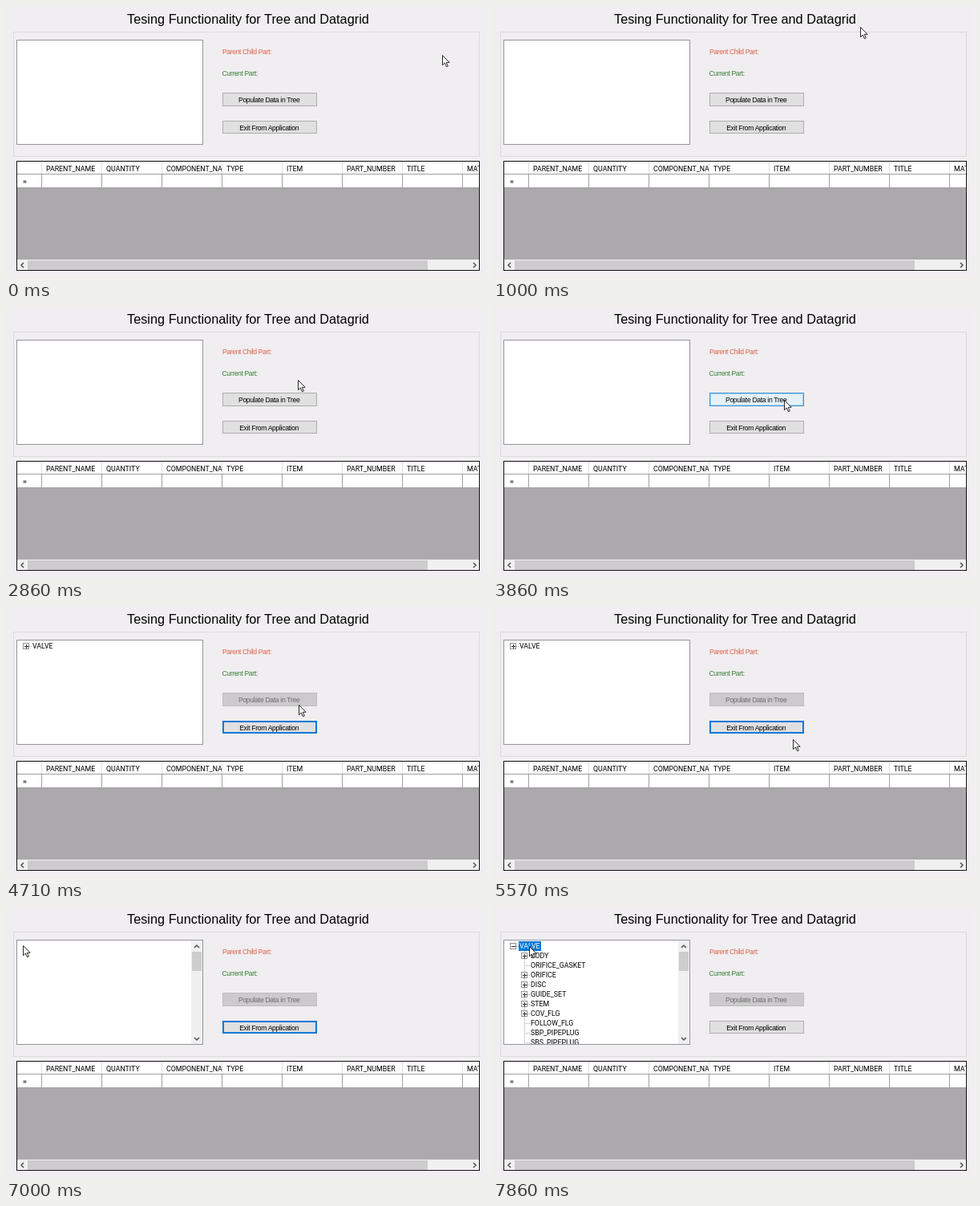
Animation, 600 px wide and 339 px high, one loop 8 s. Source, as an HTML page:

```html
<!DOCTYPE html>
<html lang="en">
<head>
<meta charset="utf-8">
<title>Tree and Datagrid</title>
<style>
  html, body { margin: 0; width: 100%; height: 100%; overflow: hidden; background: #f0eef0; }
  svg { display: block; width: 100%; height: 100%; }
  text { font: 8.6px "Liberation Sans", Arial, sans-serif; letter-spacing: -.38px; white-space: pre; }
  rect, .line { shape-rendering: crispEdges; }
  .line { fill: none; stroke: #a0a0a0; }
  .light { stroke: #dedede; }
  .chevron { fill: none; stroke: #505050; stroke-width: 1.5; }
  .dots { stroke-dasharray: 1 1; }
  #title { font-size: 16.25px; letter-spacing: .025px; }
  .caps text { font: 8.8px Roboto, sans-serif; letter-spacing: 0; }
  .button rect { fill: #e1e0e1; stroke: #adadad; }
  .button text { text-anchor: middle; letter-spacing: -.32px; }
  .button .ring { fill: none; stroke: none; }
  .hover rect { fill: #e5f1f8; stroke: #3c97d8; }
  .hover .ring { stroke: #a4cfec; }
  .focus rect, .focus .ring { stroke: #0078d7; }
  .disabled rect { fill: #cccacc; stroke: #bfbfbf; }
  .disabled text { fill: #6d6d6d; }
</style>
</head>
<body>
<svg viewBox="0 0 600 339">
  <clipPath id="treeClip"><rect x="14" y="43" width="231" height="129"/></clipPath>
  <clipPath id="gridClip"><rect x="14" y="194" width="576" height="135"/></clipPath>

  <text id="title" x="151" y="22">Tesing Functionality for Tree and Datagrid</text>
  <rect class="line" x="9.5" y="32.5" width="581" height="155" style="stroke:#dcdcdc"/>
  <text x="270" y="60" fill="#dc6048">Parent Child Part:</text>
  <text x="269.5" y="86.5" fill="#3a8038">Current Part:</text>

  <g id="populate" class="button">
    <rect x="270.5" y="108.5" width="117" height="16"/>
    <rect class="ring" x="271.5" y="109.5" width="115" height="14"/>
    <text x="328.2" y="120">Populate Data in Tree</text>
  </g>
  <g id="exit" class="button">
    <rect x="270.5" y="143.5" width="117" height="15"/>
    <rect class="ring" x="271.5" y="144.5" width="115" height="13"/>
    <text x="328.2" y="154.5">Exit From Application</text>
  </g>

  <rect x="13.5" y="42.5" width="232" height="130" fill="#fff" stroke="#94949c"/>
  <g class="caps" clip-path="url(#treeClip)">
    <g id="closedTree"></g>
    <g id="openTree"></g>
    <g id="treeScroll">
      <rect x="231" y="43" width="14" height="129" fill="#f0f0f0"/>
      <rect x="232" y="57" width="12" height="24" fill="#cdcdcd"/>
      <path class="chevron" d="M235 52l3-3 3 3M235 164l3 3 3-3"/>
    </g>
  </g>

  <g class="caps" clip-path="url(#gridClip)">
    <rect x="14" y="194" width="577" height="136" fill="#aba9ab"/>
    <rect x="14" y="194" width="577" height="32" fill="#fff"/>
    <path class="line" d="M14 209.5H590M14 226.5H590"/>
    <g id="headers"></g>
    <path d="M21 219h5M22.2 217l2.6 4M24.8 217l-2.6 4" stroke="#444" stroke-width=".8"/>
    <rect x="14" y="316" width="577" height="14" fill="#f0f0f0"/>
    <rect x="27" y="317" width="499" height="12" fill="#cdcbcd"/>
    <path class="chevron" d="M22 320l-3 3 3 3M583 320l3 3-3 3"/>
  </g>
  <rect x="13.5" y="193.5" width="577" height="136" fill="none" stroke="#111"/>

  <path id="cursor" d="M0 0V12.2L2.8 9.5L4.9 14.2L6.8 13.4L4.7 8.8H8.6Z"
        fill="#fff" stroke="#111" stroke-width=".9"/>
</svg>
<script>
const LOOP = 8000, STEP = 1000 / 7;
const $ = id => document.getElementById(id);

const columns = ['PARENT_NAME', 'QUANTITY', 'COMPONENT_NA', 'TYPE', 'ITEM', 'PART_NUMBER', 'TITLE', 'MAT'];
$('headers').innerHTML = columns.map((name, i) => {
  const x = 44.5 + 75 * i;
  return `<path class="line light" d="M${x} 194V209"/><path class="line" d="M${x} 209V226"/>
    <text x="${x + 5.5}" y="205.7">${name}</text>`;
}).join('');

// A leading + or - draws an expander box on the branch.
function node(label, x, y, selected) {
  const sign = /^[+-]/.test(label) ? label[0] : '';
  const box = sign && `<rect x="${x - 11.5}" y="${y - 3.5}" width="7" height="7" fill="#fff" stroke="#919191"/>
    <path class="line" style="stroke:#333" d="M${x - 10} ${y + .5}h5${sign === '+' ? `M${x - 7.5} ${y - 2}v5` : ''}"/>`;
  const highlight = selected ? `<rect x="${x - 1}" y="${y - 6}" width="28" height="12" fill="#0078d7"/>` : '';
  return `<path class="line dots" d="M${x - 8} ${y + .5}h7"/>${box}${highlight}
    <text x="${x}" y="${y + 3}" fill="${selected ? '#fff' : '#000'}">${label.slice(sign.length)}</text>`;
}

const parts = ['+BODY', 'ORIFICE_GASKET', '+ORIFICE', '+DISC', '+GUIDE_SET', '+STEM', '+COV_FLG',
  'FOLLOW_FLG', 'SBP_PIPEPLUG', 'SBS_PIPEPLUG'];
$('closedTree').innerHTML = node('+VALVE', 33, 50);
$('openTree').innerHTML = '<path class="line dots" d="M39.5 56V172"/>' + node('-VALVE', 33, 50, true) +
  parts.map((part, i) => node(part, 47, 62 + 12 * i)).join('');

// Cursor keys: step, x, y
const path = [[0, 545, 61], [12, 407, 5], [20, 365, 92], [27, 364, 117], [32, 364, 117],
  [37, 379, 172], [39, 375, 166], [46, 22, 49], [50, 22, 49], [54, 46, 50], [56, 46, 50]];

function cursorAt(step) {
  const i = path.findIndex(key => key[0] > step);
  const [s0, x0, y0] = path[i - 1], [s1, x1, y1] = path[i];
  const u = (step - s0) / (s1 - s0), k = u * u * (3 - 2 * u);
  return [x0 + (x1 - x0) * k, y0 + (y1 - y0) * k];
}

const show = (id, visible) => $(id).style.display = visible ? '' : 'none';
const setState = (id, state) => $(id).setAttribute('class', 'button ' + state);

function draw(time) {
  const step = Math.min(55, Math.floor((time % LOOP + 5) / STEP));
  const [x, y] = cursorAt(step);
  const loaded = step >= 32, expanding = step >= 48, expanded = step >= 50;
  $('cursor').setAttribute('transform', `translate(${Math.round(x) - .5} ${Math.round(y) + .5})`);
  setState('populate', loaded ? 'disabled' : y >= 108 ? 'hover' : '');
  setState('exit', loaded && !expanded ? 'focus' : '');
  show('closedTree', loaded && !expanding);
  show('openTree', expanded);
  show('treeScroll', expanding);
}

const start = performance.now();
function tick() {
  draw(performance.now() - start);
  requestAnimationFrame(tick);
}
tick();
</script>
</body>
</html>
```
